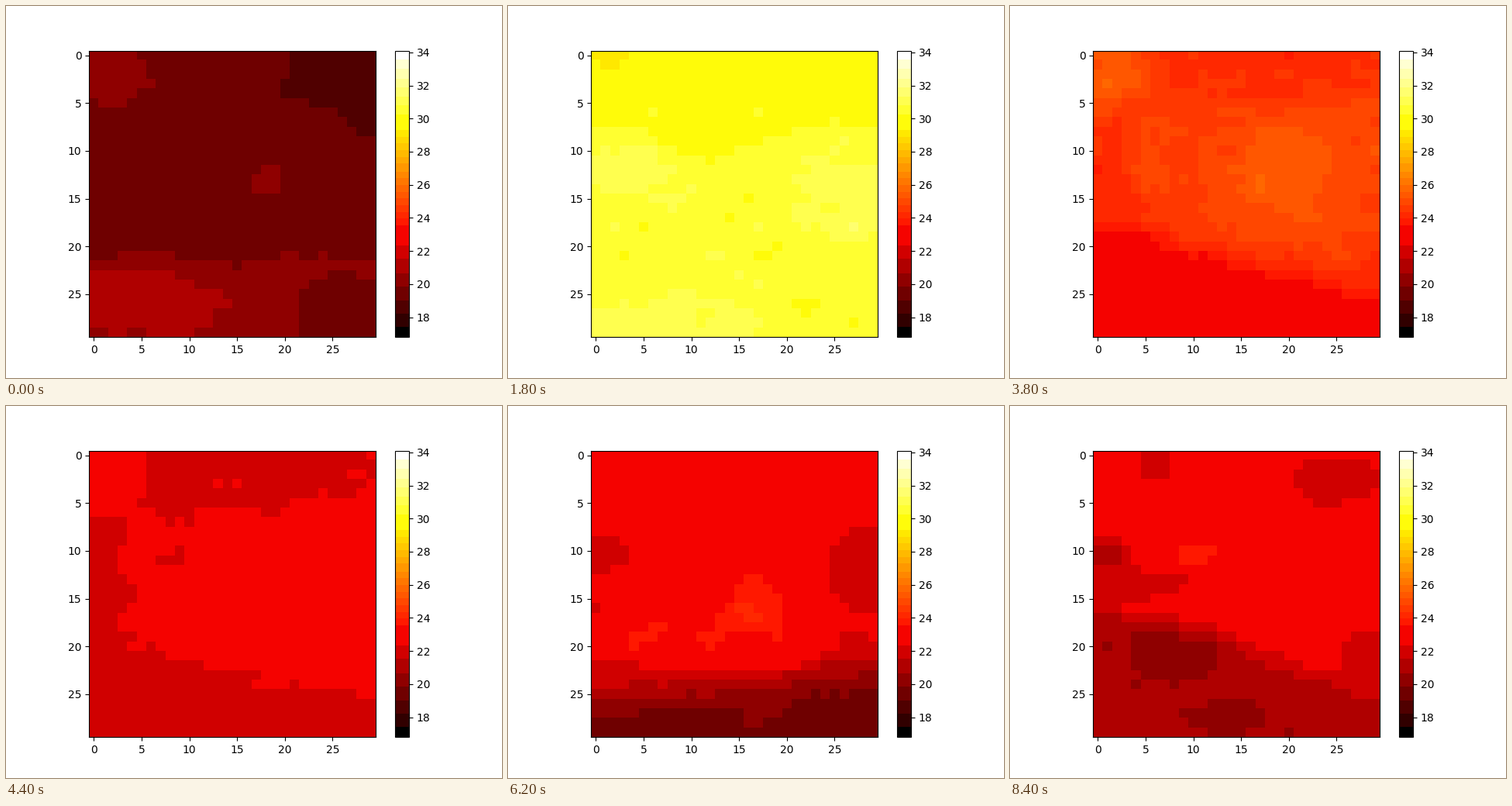
Write a matplotlib script that moves like this. It is 640 px wide and 480 px high and loops after 8600 ms.

```python
import numpy as np
import matplotlib.pyplot as plt
from itertools import groupby
from matplotlib.animation import FuncAnimation
from matplotlib.colors import ListedColormap

SIZE, FRAMES, STEP_MS = 30, 43, 200
LOW, HIGH = 16.803, 34.102
rows, cols = np.mgrid[:SIZE, :SIZE]


def banded_hot():
    """Hot colours merged into coarse bands of their mean colour."""
    hot = plt.get_cmap("hot")(np.arange(256))[:, :3] * 255
    codes = [tuple(c) for c in (hot // [32, 16, 32]).astype(int)]
    bands = [list(g) for _, g in groupby(range(256), key=lambda i: codes[i])]
    colors = np.empty((256, 3))
    for band in bands:
        colors[band] = hot[band].mean(axis=0) / 255
    colors[bands[0]], colors[bands[-1]] = 0, 1
    return ListedColormap(colors)


def blob(change, row, col, height, width):
    """Warm or cool area with a flat middle and a soft rim."""
    d2 = ((rows - row) / height) ** 2 + ((cols - col) / width) ** 2
    return change * np.exp(-d2 ** 2)


def front(change, row, slope, soft):
    """Temperature change below a slanted line."""
    return change / (1 + np.exp((row + slope * cols - rows) / soft))


def texture(seed, amount):
    """Small patches, wider than they are high."""
    noise = np.random.default_rng(seed).normal(size=(SIZE, SIZE))
    patchy = sum(np.roll(noise, k, axis=1) for k in range(3))
    patchy = patchy + np.roll(patchy, 1, axis=0)
    return amount * patchy / patchy.std()


# Weather at a few moments of the loop
keys = {
    0: 19.4 + front(0.8, 21.3, 0, 0.4) + blob(0.8, 26, 4, 4, 11)
        + blob(0.9, 2, 2, 4.3, 4) + blob(-0.75, 2, 26, 4.4, 8)
        + blob(0.85, 13.5, 18, 1.6, 2.3) + blob(-0.8, 27, 27, 4.5, 6),
    9: 30.5 + blob(-0.6, 2, 13, 6, 28) + blob(-0.8, 0, 1, 1.3, 3)
        + blob(-0.6, 8, 12, 2, 5) + blob(0.5, 12.5, 4, 3, 6)
        + blob(0.5, 15.5, 26, 5, 5.5) + blob(0.5, 27.5, 8, 2.5, 11),
    15: 29.1 + blob(-0.45, 3, 3, 4.3, 6) + blob(0.6, 3, 18, 3.5, 8)
        + blob(-0.8, 3, 27, 3, 3.5) + blob(-0.45, 7.5, 9, 1.3, 5)
        + blob(0.65, 12, 3, 5.5, 7.5) + blob(0.8, 13, 1, 2, 4)
        + blob(0.6, 11.5, 20, 2.3, 4.5) + blob(0.65, 26, 6, 5, 9)
        + blob(-0.8, 26, 24, 5, 7),
    19: 24.55 + front(-1.5, 17.8, 0.26, 0.8) + blob(0.8, 2, 1, 3.2, 5)
        + blob(-0.45, 2, 18, 3.5, 9) + blob(0.5, 12, 21, 8.5, 12)
        + blob(0.4, 12.5, 19.5, 5, 5) + blob(-0.45, 13, 0, 4, 3),
    26: 19.4 + front(0.85, 18, -0.34, 0.7) + blob(0.85, 2.5, 1, 3.5, 4)
        + blob(-0.75, 2.5, 7, 3.5, 3) + blob(0.8, 21.5, 15, 6.5, 14.5)
        + blob(0.75, 19.7, 23.5, 1.5, 2.7),
    35: 29.8 + front(-6.6, 24.8, -0.1, 0.9) + blob(-0.7, 3, 1, 6, 4.5)
        + blob(-1.9, 10.5, 1, 2, 3) + blob(-0.9, 17, 0, 4, 2.5)
        + blob(0.75, 12, 17, 6.5, 3.5) + blob(-0.7, 13, 23, 5, 3)
        + blob(-2.3, 12.5, 28, 5, 3.8) + blob(-2, 20, 25.5, 2.3, 4.5)
        + blob(-1.7, 22.5, 4, 1.7, 6.5),
    42: 22.9 + front(-1.9, 15, 0.35, 0.8) + blob(-1, 2.5, 25.5, 2.7, 5.5)
        + blob(-1, 1.3, 6, 1.5, 2) + blob(-1.9, 10.5, 0.5, 1.8, 3.2)
        + blob(-0.9, 13.5, 4.5, 1.6, 6) + blob(0.8, 10.5, 10.5, 1.1, 2.3)
        + blob(-0.9, 20.5, 8.5, 3, 5.5) + blob(-0.8, 27.5, 13.5, 1.8, 4.5)
        + blob(-1, 21.5, 28, 3.5, 2.3),
}
keys = {k: grid + texture(k, 0.14) for k, grid in keys.items()}
means = {k: grid.mean() for k, grid in keys.items()}
# Daily turning points between the key moments
curve = sorted({**means, 3: 18.2, 6: 23.6, 12: 32.2, 29: 19.3}.items())


def temperature(i):
    a = max(k for k in keys if k <= i)
    b = min(k for k in keys if k >= i)
    u = (i - a) / max(b - a, 1)
    shape = (1 - u) * (keys[a] - means[a]) + u * (keys[b] - means[b])
    return np.clip(np.interp(i, *zip(*curve)) + shape, LOW, HIGH)


fig, ax = plt.subplots(figsize=(6.4, 4.8), dpi=100)
image = ax.imshow(temperature(0), cmap=banded_hot(), vmin=LOW, vmax=HIGH)
fig.colorbar(image)


def update(i):
    image.set_data(temperature(i))
    return [image]


anim = FuncAnimation(fig, update, frames=FRAMES, interval=STEP_MS,
                     repeat=True, repeat_delay=0)
plt.show()
```
